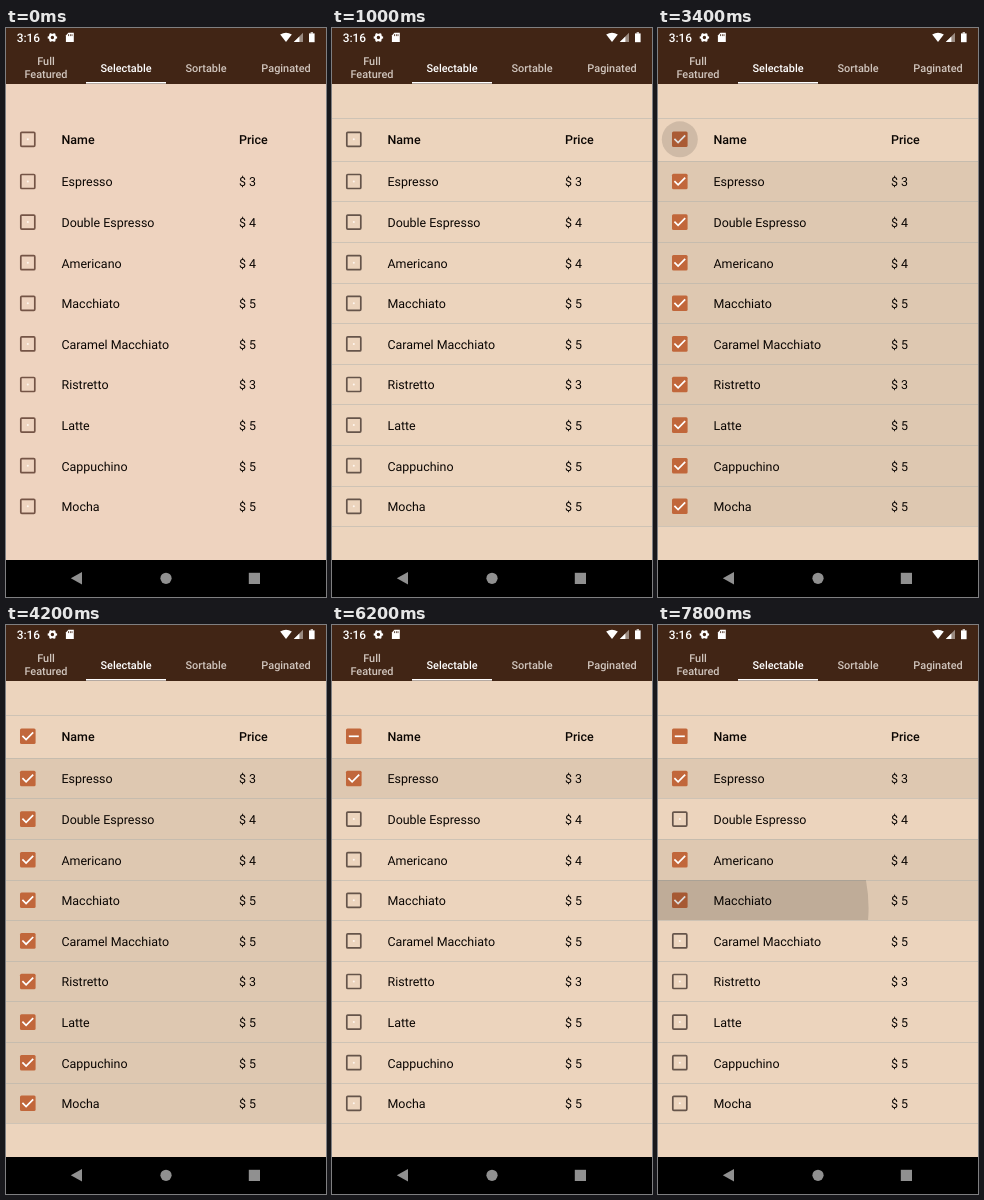
An HTML page with a canvas that plays this animation: 320 by 569 pixels, repeating every 8 s.

```html
<!DOCTYPE html>
<html lang="en">
<head>
<meta charset="utf-8">
<title>Selectable table</title>
<style>
html, body { margin: 0; width: 100%; height: 100%; overflow: hidden; background: #000; }
canvas { display: block; width: 100vw; height: 100vh; }
</style>
</head>
<body>
<canvas></canvas>
<script>
const W = 320, H = 569, LOOP = 8000, STEP = 200;
const canvas = document.querySelector('canvas');
const ctx = canvas.getContext('2d');
const ratio = window.devicePixelRatio || 1;
canvas.width = W * ratio;
canvas.height = H * ratio;
ctx.textRendering = 'geometricPrecision';

const ROW_TOP = 133.2, ROW_H = 40.6, HEAD_Y = 111.3, BOX_X = 21.8;
const NAME_X = 55.5, PRICE_X = 233, FONT_SIZE = 12.45;
const ACCENT = '#c1673b', BROWN = '#412515', INK = '#0b0603', NAV = '#909090';
const items = [['Espresso', 3], ['Double Espresso', 4], ['Americano', 4], ['Macchiato', 5],
  ['Caramel Macchiato', 5], ['Ristretto', 3], ['Latte', 5], ['Cappuchino', 5], ['Mocha', 5]];
// Row -1 is the header checkbox, which toggles every row.
const taps = [[3250, -1], [4600, -1], [5500, 0], [6700, 2], [7700, 3]];

const rowTop = i => Math.floor(ROW_TOP + i * ROW_H);
const rowMiddle = i => ROW_TOP + (i + 0.5) * ROW_H;

function rect(x, y, w, h, color) {
  ctx.fillStyle = color;
  ctx.fillRect(x, y, w, h);
}
function circle(x, y, r, color) {
  ctx.fillStyle = color;
  ctx.beginPath();
  ctx.arc(x, y, r, 0, 2 * Math.PI);
  ctx.fill();
}
function polygon(points, color) {
  ctx.fillStyle = color;
  ctx.fill(new Path2D(`M${points}Z`));
}
function stroke(path, color, width) {
  ctx.strokeStyle = color;
  ctx.lineWidth = width;
  ctx.stroke(new Path2D(path));
}
function text(str, x, baseline, size = FONT_SIZE, color = INK, weight = 400, align = 'left') {
  ctx.font = `${weight} ${size}px Roboto, sans-serif`;
  ctx.textAlign = align;
  ctx.fillStyle = color;
  ctx.fillText(str, x, baseline);
}

function statusBar() {
  text('3:16', 10.7, 13.6, 11.9, '#fff', 500);

  ctx.strokeStyle = '#fff';
  ctx.lineWidth = 2;
  ctx.beginPath();
  ctx.arc(46.4, 9.5, 2.7, 0, 2 * Math.PI);
  ctx.stroke();
  for (let i = 0; i < 6; i++) {
    const a = i * Math.PI / 3, c = Math.cos(a), s = Math.sin(a);
    stroke(`M${46.4 + 3.2 * c},${9.5 + 3.2 * s}l${1.5 * c},${1.5 * s}`, '#fff', 2.2);
  }

  polygon('62.4,4.8 67.8,4.8 67.8,14 59.9,14 59.9,7.5', '#fff');
  for (let x = 62.2; x < 67; x += 1.7) rect(x, 6.2, 0.8, 1.9, BROWN);

  polygon('274.2,6.6 Q280,2.8 285.8,6.6 L280,14', '#fff');
  polygon('297,4.8 297,14 287.8,14', '#9a8b81');
  polygon('293.4,8.4 293.4,14 287.8,14', '#fff');
  rect(303, 5.4, 5.6, 8.8, '#fff');
  rect(304.6, 4.3, 2.4, 1.3, '#fff');
}

function tabs() {
  const dim = '#d0c5bd';
  const label = (str, x, y, color = dim) => text(str, x, y, 10.9, color, 500, 'center');
  label('Full', 40, 37);
  label('Featured', 40, 49.8);
  label('Selectable', 120, 43.7, '#fff');
  label('Sortable', 200, 43.7);
  label('Paginated', 280, 43.7);
  rect(80, 54, 80, 1.6, '#fff');
}

function checkbox(y, state, outline) {
  ctx.save();
  ctx.translate(BOX_X, y);
  if (state === 'off') {
    ctx.strokeStyle = outline;
    ctx.lineWidth = 1.7;
    ctx.beginPath();
    ctx.roundRect(-7, -7, 14, 14, 1);
    ctx.stroke();
    circle(0, 0, 1, '#fff6ee');
  } else {
    ctx.fillStyle = ACCENT;
    ctx.beginPath();
    ctx.roundRect(-7.8, -7.8, 15.6, 15.6, 1.5);
    ctx.fill();
    stroke(state === 'on' ? 'M-5.4,-.4L-1.7,3.3L5.4,-3.9' : 'M-5,0H5', '#fff', 1.7);
  }
  ctx.restore();
}

function ripple(age, row) {
  if (age < 0 || age >= 500) return;
  const grow = 1 - (1 - Math.min(1, age / 300)) ** 2;
  const fade = Math.min(1, (500 - age) / 200);
  if (row < 0) return circle(BOX_X, HEAD_Y, 24 * grow, `rgba(0,0,0,${0.12 * fade})`);
  ctx.save();
  ctx.beginPath();
  ctx.rect(0, rowTop(row), W, rowTop(row + 1) - rowTop(row));
  ctx.clip();
  circle(60, rowTop(row) + 28, 271 * grow, `rgba(0,0,0,${0.14 * fade})`);
  ctx.restore();
}

function selectionAt(t) {
  let selected = items.map(() => false);
  for (const [start, row] of taps) {
    if (t < start + 100) continue;
    if (row < 0) {
      const all = selected.every(Boolean);
      selected = selected.map(() => !all);
    } else {
      selected[row] = !selected[row];
    }
  }
  return selected;
}

function table(t) {
  const settled = t >= 400;
  const outline = settled ? '#65544a' : '#745446';
  const selected = selectionAt(t);
  const count = selected.filter(Boolean).length;

  selected.forEach((on, i) => {
    if (on) rect(0, rowTop(i), W, rowTop(i + 1) - rowTop(i), '#dec8b1');
  });
  if (settled) {
    const lines = [90, ...Array.from({ length: items.length + 1 }, (_, i) => rowTop(i))];
    lines.forEach(y => rect(0, y, W, 1, 'rgba(165,172,170,.42)'));
  }

  text('Name', NAME_X, HEAD_Y + 4.7, FONT_SIZE, INK, 500);
  text('Price', PRICE_X, HEAD_Y + 4.7, FONT_SIZE, INK, 500);
  checkbox(HEAD_Y, !count ? 'off' : count === items.length ? 'on' : 'some', outline);

  items.forEach(([name, price], i) => {
    const y = rowMiddle(i);
    text(name, NAME_X, y + 4.8);
    text(`$ ${price}`, PRICE_X, y + 4.8);
    checkbox(y, selected[i] ? 'on' : 'off', outline);
  });
  taps.forEach(([start, row]) => ripple(t - start, row));
}

function navBar() {
  rect(0, 532, W, H - 532, '#000');
  polygon('64.8,550.3 76,544 76,556.6', NAV);
  circle(160, 550.3, 5.6, NAV);
  rect(242.8, 544.8, 11.2, 11.2, NAV);
}

function draw(t) {
  ctx.setTransform(ratio, 0, 0, ratio, 0, 0);
  rect(0, 0, W, H, t < 400 ? '#eed3bf' : '#ecd4bd');
  rect(0, 0, W, 56, BROWN);
  statusBar();
  tabs();
  table(t);
  navBar();
}

const begin = performance.now();
function tick() {
  const t = (performance.now() - begin) % LOOP;
  draw(Math.floor(t / STEP) * STEP);
  requestAnimationFrame(tick);
}
tick();
</script>
</body>
</html>
```
